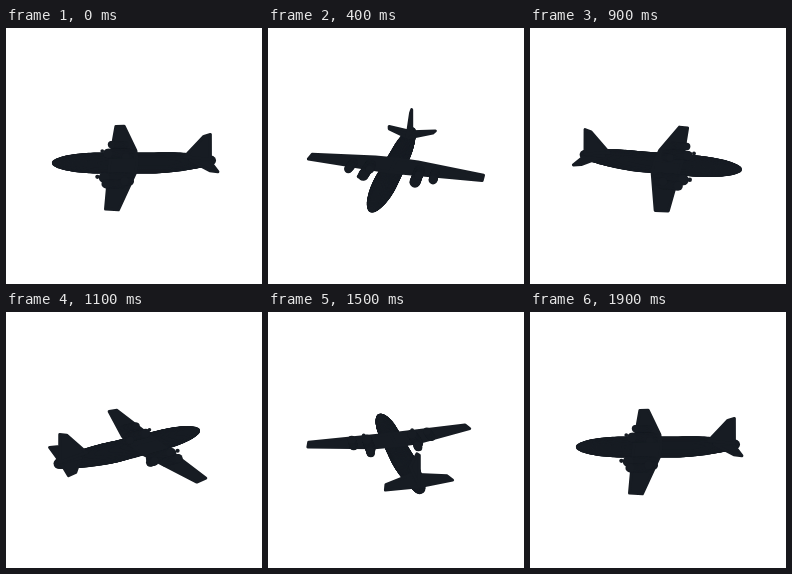
Write an HTML page with a canvas that moves like this. It is 256 by 256 pixels and loops after 2000 ms.

```html
<!DOCTYPE html>
<html lang="en">
<head>
<meta charset="utf-8">
<title>Turning aircraft</title>
<style>
  html, body { margin: 0; width: 100%; height: 100%; overflow: hidden; background: #fff; }
  canvas { display: block; width: 256px; height: 256px; }
</style>
</head>
<body>
<canvas id="stage" width="256" height="256"></canvas>
<script>
const ctx = document.getElementById('stage').getContext('2d');
const LOOP = 2000, STEP = 100, POSES = 19;
const CAMERA = 335, TILT = 28.4 * Math.PI / 180;
const CENTER = { x: 128, y: 135 };
const INK = '#171c23';

// Model axes: a = towards the nose, b = along the wing, z = up.
function project(angle, [a, b, z]) {
  const c = Math.cos(angle), s = Math.sin(angle);
  const x = -a * c + b * s;
  const ground = a * s + b * c;
  const depth = ground * Math.cos(TILT) + z * Math.sin(TILT);
  const scale = CAMERA / (CAMERA - depth);
  const y = ground * Math.sin(TILT) - z * Math.cos(TILT);
  return { x: CENTER.x + x * scale, y: CENTER.y + y * scale, scale };
}

function panel(angle, points) {
  ctx.beginPath();
  for (const point of points) {
    const p = project(angle, point);
    ctx.lineTo(p.x, p.y);
  }
  ctx.closePath();
  ctx.fill();
  ctx.stroke();
}

function ball(angle, point, radius) {
  const p = project(angle, point);
  ctx.beginPath();
  ctx.arc(p.x, p.y, radius * p.scale, 0, Math.PI * 2);
  ctx.fill();
}

// A round body swept along the nose axis.
function tube(angle, from, to, b, z, radius) {
  for (let a = from; a <= to; a++) ball(angle, [a, b, z], radius);
}

function hullRadius(a) {
  if (a > 34) return 10.5 * Math.sqrt(Math.max(0, 1 - ((a - 34) / 47) ** 2));
  if (a < -20) return 10.5 - 6 * ((-20 - a) / 58) ** 2;
  return 10.5;
}

function drawPlane(angle) {
  ctx.fillStyle = ctx.strokeStyle = INK;
  ctx.lineJoin = 'round';
  ctx.lineWidth = 3;

  for (let a = -77; a <= 80; a++) {
    const lift = a < -20 ? (-20 - a) * 0.05 : 0;
    ball(angle, [a, 0, lift], hullRadius(a));
  }

  for (const side of [-1, 1]) {
    panel(angle, [[24, 0, 3], [22, side * 84, 5], [12, side * 85, 5], [-2, side * 22, 3], [-3, 0, 3]]);
    panel(angle, [[-56, 0, 3], [-70, side * 26, 6], [-77, side * 28, 6], [-75, 0, 3]]);
    tube(angle, 5, 28, side * 25, -2, 5);
    tube(angle, 10, 25, side * 41, 1, 4);
    ball(angle, [34, side * 27, 0], 2);
    tube(angle, 4, 9, side * 25, -6, 4);
  }

  panel(angle, [[-50, 0, 7], [-67, 0, 29], [-73, 0, 31], [-76, 0, 4]]);
}

function frame() {
  const step = Math.floor(performance.now() % LOOP / STEP);
  ctx.fillStyle = '#fff';
  ctx.fillRect(0, 0, 256, 256);
  drawPlane(step % POSES / POSES * Math.PI * 2);
  requestAnimationFrame(frame);
}
frame();
</script>
</body>
</html>
```
